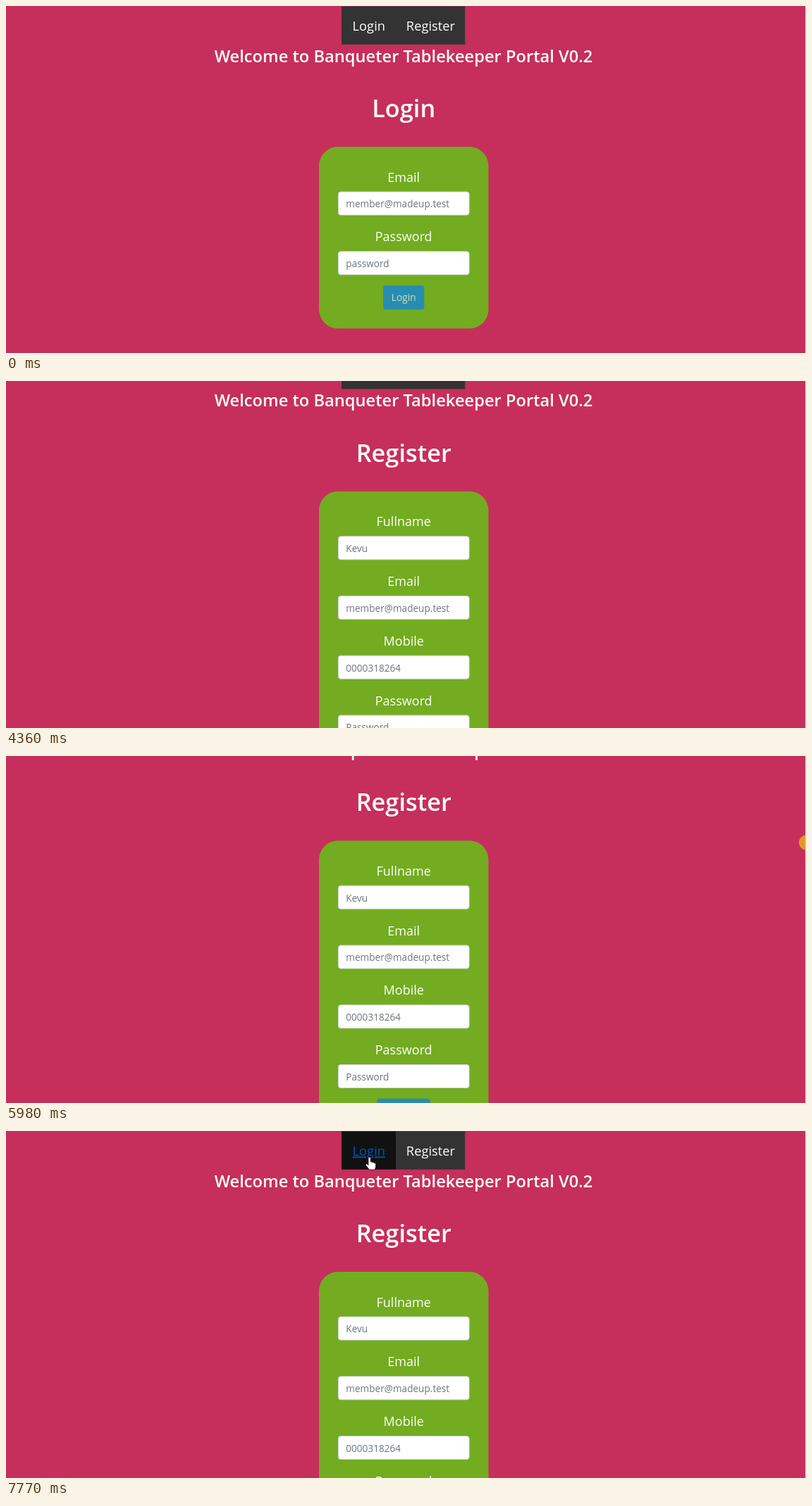
An HTML page that plays this animation: 1135x493 px, repeating every 7990 ms.

```html
<!DOCTYPE html>
<html lang="en">
<head>
<meta charset="utf-8">
<title>Sign-in demo</title>
<style>
  html, body { margin: 0; width: 100%; height: 100%; overflow: hidden; background: #c62f5b; }
  svg { display: block; width: 1135px; height: 493px; }
  text { font-family: "Open Sans", "Noto Sans", sans-serif; fill: #fff; text-anchor: middle; }
  .title { font-size: 23.7px; font-weight: 600; }
  .head { font-size: 34.3px; font-weight: 600; }
  .label { font-size: 18px; }
  .hint { font-size: 13.6px; fill: #6c757d; text-anchor: start; }
  .action { font-size: 13.7px; fill: #cee2b1; }
  .card { fill: #73ac20; }
  .field { fill: #fff; stroke: #ced4da; }
  .button { fill: #288cb1; }
  .tab rect { fill: #333; }
  .tab text { font-size: 18.3px; }
  .tab.hover rect { fill: #111; }
  .tab.hover text { fill: #0056b3; text-decoration: underline; }
  .cursor path { fill: #fff; stroke: #222; stroke-width: .9; stroke-linejoin: round; }
</style>
</head>
<body>
<svg viewBox="0 0 1135 493">
  <rect width="1135" height="493" fill="#c62f5b"/>
  <g id="world">
    <g class="tab" id="tabLogin">
      <rect x="476" y=".5" width="77" height="54.2"/>
      <text x="514.8" y="35.3">Login</text>
    </g>
    <g class="tab" id="tabRegister">
      <rect x="553" y=".5" width="98.3" height="54.2"/>
      <text x="602.4" y="35.3">Register</text>
    </g>
    <text class="title" x="564" y="79.6">Welcome to Banqueter Tablekeeper Portal V0.2</text>
    <g id="login"></g>
    <g id="register"></g>
  </g>
  <rect x="1134" width="1" height="493" fill="#f3d3dd"/>
  <circle id="press" r="11" fill="#ffe100" fill-opacity=".58"/>
  <g class="cursor" id="cursor">
    <path id="arrow" d="M0 0V16.2L3.8 12.7L6.3 18.3L8.9 17.2L6.4 11.7H11.6Z"/>
    <path id="hand" d="M-2 1.5Q-2 0 -.3 0Q1.3 0 1.3 1.5V7Q3.5 6.2 4 7.6Q6 7 6.4 8.4Q8.7 8 8.7 10V13Q8.5 16 7 18H-.5Q-2.5 15.5 -5.5 11.5Q-6 10 -4.5 9.7Q-3 9.8 -2 11.5Z"/>
  </g>
</svg>
<script>
const $ = id => document.getElementById(id);
const LOOP = 7990, MID = 564.2, ROW = 84.75, MAX_SCROLL = 137.5;

const text = (cls, x, y, s) => `<text class="${cls}" x="${x}" y="${y}">${s}</text>`;
const box = (cls, x, y, w, h, r) =>
  `<rect class="${cls}" x="${x}" y="${y}" width="${w}" height="${h}" rx="${r}"/>`;

function form(name, buttonWidth, rows) {
  const end = 397 + (rows.length - 2) * ROW;
  const fields = rows.map(([label, hint], i) => {
    const y = i * ROW;
    return text("label", MID, 249.6 + y, label) +
      box("field", 471.5, 264 + y, 185.6, 33, 3.4) +
      text("hint", 482.3, 286.4 + y, hint);
  });
  return text("head", MID, 158, name) +
    box("card", 444, 200, 240.5, end - 138.8, 27) +
    fields.join("") +
    box("button", MID - buttonWidth / 2, end, buttonWidth, 34.3, 3.6) +
    text("action", MID, end + 22.4, name);
}

const mail = ["Email", "member@madeup.test"];
$("login").innerHTML = form("Login", 58.2, [mail, ["Password", "password"]]);
$("register").innerHTML = form("Register", 75.2,
  [["Fullname", "Kevu"], mail, ["Mobile", "0000318264"], ["Password", "Password"]]);

// Stepped progress: the first of n steps lands at a, the last at b.
function steps(t, a, b, n) {
  if (t < a) return 0;
  return Math.min(n, Math.floor((t - a) / (b - a) * (n - 1) + 1e-6) + 1) / n;
}

// start, end, steps, from x, y, to x, y
const moves = [
  [280, 660, 6, 940, 358, 839, 197],
  [910, 1060, 3, 839, 197, 628, 50],
  [1210, 1520, 5, 628, 50, 606, 37],
  [2510, 3030, 8, 606, 37, 1117, 57],
  [3260, 3340, 2, 1117, 57, 1137, 58],
  [5660, 6440, 11, 1143.5, 183, 1127, 51],
  [6540, 6750, 4, 1127, 51, 1124, 15],
  [7060, 7770, 10, 1124, 15, 516, 37]
];

function pointer(t) {
  const move = moves.filter(m => t >= m[0]).pop();
  if (!move) return [-99, -99];
  const [a, b, n, x0, y0, x1, y1] = move;
  const p = steps(t, a, b, n);
  const dip = a === 7060 ? 104 * p * (1 - p) : 0;
  return [x0 + (x1 - x0) * p, y0 + (y1 - y0) * p + dip];
}

function scroll(t) {
  if (t < 5660) return 119 * steps(t, 4120, 4890, 11) + 18.5 * steps(t, 4980, 5130, 3);
  const p = (steps(t, 5660, 6440, 11) * 11 - 1) / 10;
  return MAX_SCROLL * Math.max(0, 1 - 1.05 * p);
}

const show = (id, on) => $(id).setAttribute("display", on ? "inline" : "none");
const place = (id, x, y) => $(id).setAttribute("transform", `translate(${x} ${y})`);
const within = (t, a, b) => t >= a && t < b;

function draw(t) {
  const [x, y] = pointer(t);
  const overNav = y > 0 && y < 50;
  const onLogin = overNav && x > 476 && x < 553;
  const onRegister = overNav && x >= 553 && x < 651;

  $("tabLogin").classList.toggle("hover", onLogin);
  $("tabRegister").classList.toggle("hover", onRegister);
  show("login", t < 2090);
  show("register", t >= 2090);
  place("world", 0, -scroll(t));

  place("cursor", x, y);
  show("hand", onLogin || onRegister);
  show("arrow", !(onLogin || onRegister));
  place("press", x, y);
  show("press", within(t, 1780, 2030) || within(t, 5660, 6540));
}

const start = performance.now();
function tick() {
  draw((performance.now() - start) % LOOP);
  requestAnimationFrame(tick);
}
draw(0);
requestAnimationFrame(tick);
</script>
</body>
</html>
```
